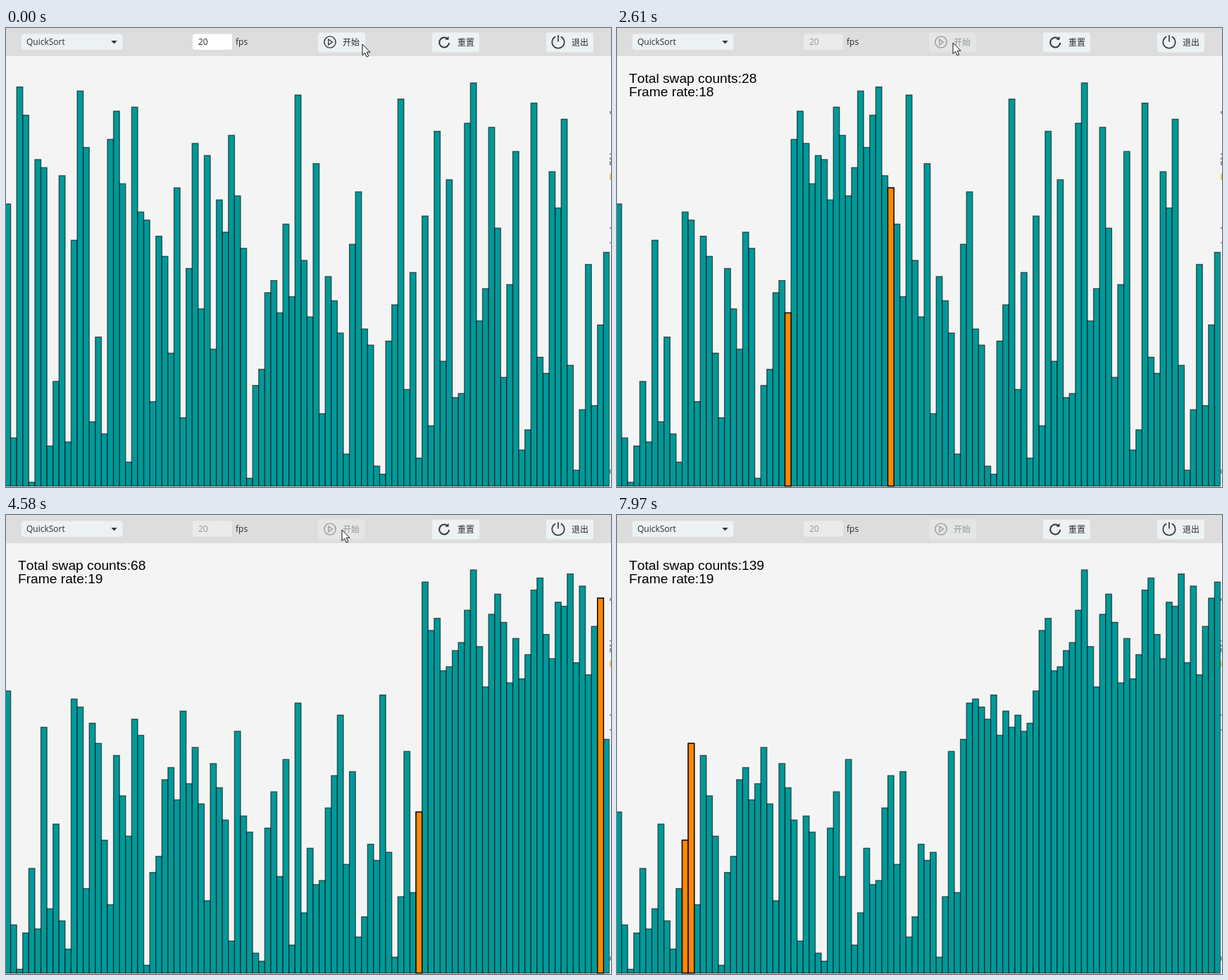
Animation, 859 px wide and 652 px high, one loop 8000 ms. Source, as an HTML page:

```html
<!DOCTYPE html>
<html lang="zh">
<head>
<meta charset="utf-8">
<title>QuickSort</title>
<style>
  html, body { margin: 0; width: 100%; height: 100%; overflow: hidden; background: #f4f4f4; }
  svg { display: block; width: 859px; height: 652px; }
  .ui { font: 12px "Open Sans", "Noto Sans CJK SC", "Noto Sans CJK", sans-serif; fill: #2b2b2b; }
  .info { font: 19.2px "Liberation Sans", Arial, sans-serif; font-kerning: none; fill: #000; }
  .icon { fill: none; stroke: #333; stroke-width: 1.6; }
  .box { fill: #ecf1f4; }
</style>
</head>
<body>
<svg viewBox="0 0 859 652">
  <rect width="859" height="652" fill="#f4f4f4"/>
  <rect width="859" height="40" fill="#dddddd"/>

  <g class="ui">
    <rect class="box" x="22" y="8.5" width="143.5" height="22.5" rx="3"/>
    <text x="29" y="24">QuickSort</text>
    <path d="M149.3 18h8.4l-4.2 4.4z" fill="#333"/>

    <g id="field">
      <rect x="265" y="8.5" width="56" height="22.5" rx="3" fill="#fff"/>
      <text x="273" y="24">20</text>
    </g>
    <text x="326" y="24">fps</text>

    <g id="start">
      <rect class="box" x="443" y="6.5" width="67" height="28" rx="3"/>
      <circle class="icon" cx="460" cy="20" r="8.1" style="stroke-width:1.4"/>
      <path class="icon" d="M457.8 16l5.6 4-5.6 4z" style="stroke-width:1.3"/>
      <text x="478" y="24.5">开始</text>
    </g>

    <rect class="box" x="605" y="6.5" width="67" height="28" rx="3"/>
    <path class="icon" d="M626 14.6A7 7 0 1 0 629.2 21" style="stroke-width:2"/>
    <path d="M623.5 16.8l5-5v5z" fill="#333"/>
    <text x="641" y="24.5" font-weight="500">重置</text>

    <rect class="box" x="767" y="6.5" width="67" height="28" rx="3"/>
    <path class="icon" d="M780.2 12.2A8.7 8.7 0 1 0 787.8 12.2M784 10v9.5"/>
    <text x="803" y="24.5">退出</text>
  </g>

  <g id="bars" stroke="#000" stroke-opacity=".58" stroke-width="1.4" fill="#009999"></g>
  <g id="marks" stroke="#000" stroke-width="1.4" fill="#ff8800"></g>

  <g id="info" class="info">
    <text id="count" x="17" y="78"></text>
    <text id="rate" x="17" y="97"></text>
  </g>

  <rect x="857" width="2" y="40" height="612" fill="#fafafa"/>
  <path d="M858 118v4M858 178v2M858 184v3M858 189v6M858 283v2M858 304v2M858 627v6" stroke="#999" stroke-width="2"/>
  <path d="M858 207v9" stroke="#f0c860" stroke-width="2"/>

  <path id="cursor" d="M0 0V15.6L3.6 12.3 6.2 18 8.8 16.9 6.3 11.3H11z" fill="#fff" stroke="#111"/>
</svg>
<script>
const LOOP = 8000, PITCH = 8.59, UNIT = 5.73, FLOOR = 651;
const BEGIN = 1264.2, STEP = 48.06;

const values = [
  70, 12, 99, 92, 1, 81, 79, 10, 26, 77, 11, 61, 98, 84, 16, 37, 13, 86, 93, 75,
  6, 94, 68, 66, 21, 62, 57, 33, 74, 17, 54, 85, 44, 82, 34, 71, 63, 87, 72, 59,
  2, 25, 29, 48, 51, 43, 65, 47, 97, 56, 42, 80, 18, 52, 46, 38, 8, 60, 73, 39,
  35, 5, 3, 36, 45, 96, 24, 53, 7, 67, 15, 88, 31, 76, 22, 23, 90, 100, 41, 49,
  89, 64, 27, 50, 83, 9, 14, 95, 32, 28, 78, 69, 91, 30, 4, 19, 55, 20, 40, 58
];
const rates = [20, 20, 19, 18, 20, 19, 19, 20, 19, 20, 19, 20, 19, 20, 20, 19, 20, 19];

// Snapshot of the array after every swap, self-swaps included
const states = [{ list: values.slice(), pair: [] }];
function swap(i, j) {
  [values[i], values[j]] = [values[j], values[i]];
  states.push({ list: values.slice(), pair: [i, j] });
}
function sort(lo, hi) {
  if (lo >= hi) return;
  const pivot = values[lo];
  let p = lo;
  for (let j = lo + 1; j <= hi; j++) if (values[j] < pivot) swap(++p, j);
  swap(lo, p);
  sort(lo, p - 1);
  sort(p + 1, hi);
}
sort(0, 99);

// The screen refreshes every 60 ms, now and then after 50 ms
const early = new Set([20, 26, 36, 60, 78, 120, 131]);
const ticks = [0];
for (let k = 1; k < 135; k++) ticks.push(ticks[k - 1] + (early.has(k) ? 50 : 60));

// Pointer stops: time, x, y
const stops = [
  [0, 506, 23], [300, 488, 17], [560, 471, 14], [840, 473, 20], [960, 475, 24],
  [1760, 475, 24], [1950, 477, 21], [6180, 477, 21], [6350, 590, 18], [6600, 753, -22]
];
function pointer(t) {
  const n = stops.findIndex(s => s[0] > t);
  if (n < 0) return stops[stops.length - 1].slice(1);
  const [t0, x0, y0] = stops[n - 1], [t1, x1, y1] = stops[n];
  const u = (t - t0) / (t1 - t0);
  return [x0 + (x1 - x0) * u, y0 + (y1 - y0) * u];
}

const el = id => document.getElementById(id);
function addBar(parent) {
  const r = document.createElementNS("http://www.w3.org/2000/svg", "rect");
  r.setAttribute("width", PITCH);
  return parent.appendChild(r);
}
function place(bar, i, v) {
  bar.setAttribute("x", i * PITCH - 2);
  bar.setAttribute("y", FLOOR - v * UNIT);
  bar.setAttribute("height", v * UNIT - 0.4);
}
const bars = values.map(() => addBar(el("bars")));
const marks = [addBar(el("marks")), addBar(el("marks"))];

function draw(time) {
  const t = ticks.filter(k => k <= time).pop();
  const n = Math.max(0, Math.floor((t - BEGIN) / STEP));
  const { list, pair } = states[n];

  bars.forEach((bar, i) => place(bar, i, list[i]));
  el("marks").style.display = pair.length ? "" : "none";
  pair.forEach((i, k) => place(marks[k], i, list[i]));

  const off = t >= BEGIN - 50;
  el("field").style.opacity = el("start").style.opacity = off ? 0.4 : 1;
  el("info").style.display = t >= BEGIN ? "" : "none";
  el("count").textContent = "Total swap counts:" + n;
  el("rate").textContent = "Frame rate:" + rates[n >> 3];

  const [x, y] = pointer(t);
  el("cursor").setAttribute("transform", `translate(${x} ${y})`);
}

const origin = performance.now();
function loop() {
  draw((performance.now() - origin) % LOOP);
  requestAnimationFrame(loop);
}
loop();
</script>
</body>
</html>
```
